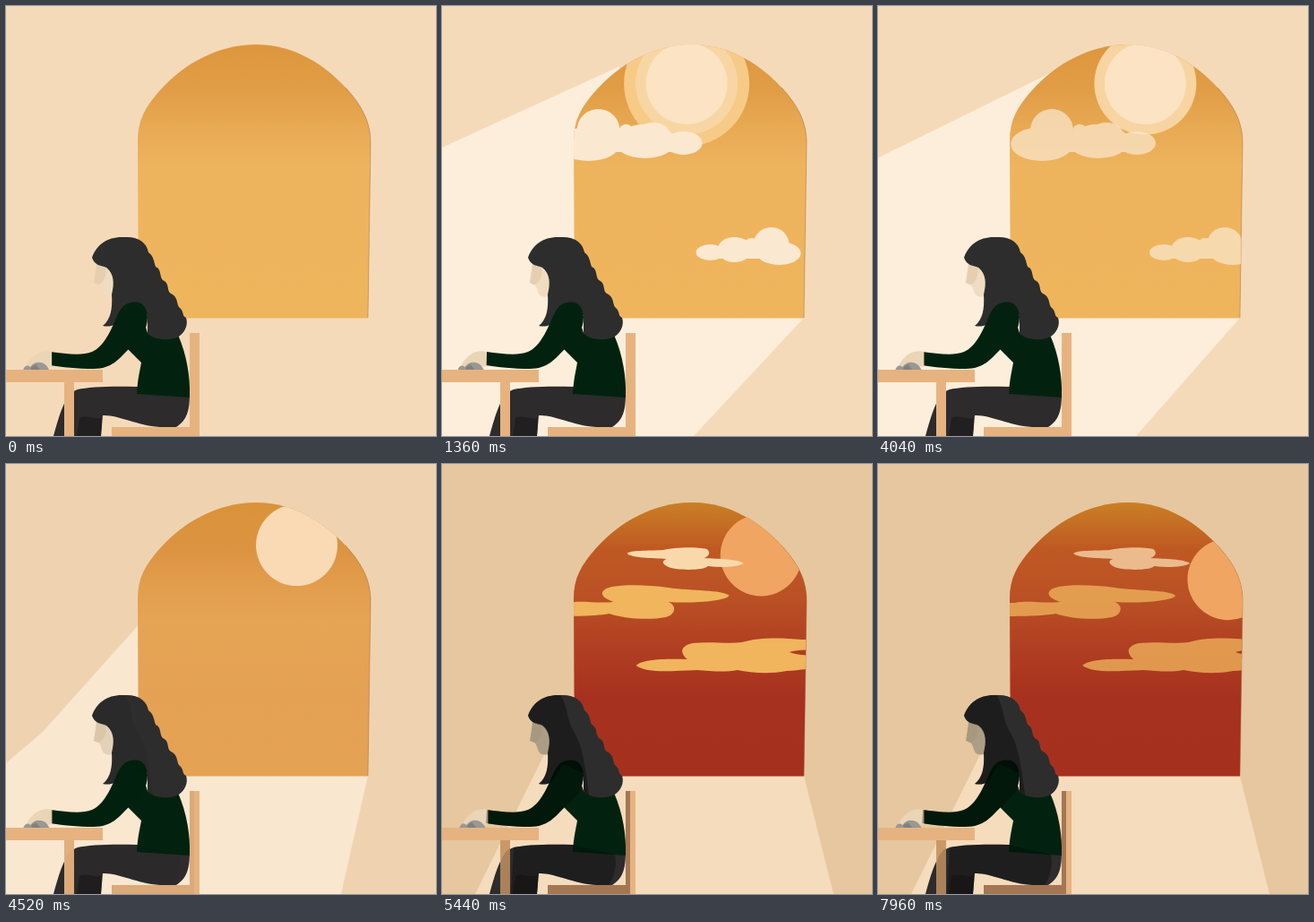
Animation, 480 px wide and 480 px high, one loop 8 s. Source, as an HTML page:

```html
<!DOCTYPE html>
<html lang="en">
<head>
<meta charset="utf-8">
<title>Window light</title>
<style>
html, body { margin: 0; width: 100%; height: 100%; overflow: hidden; background: #f5daba; }
svg { display: block; width: 100vw; height: 100vh; }
</style>
</head>
<body>
<svg viewBox="0 0 480 480">
  <defs>
    <linearGradient id="day" gradientUnits="userSpaceOnUse" x1="0" y1="42" x2="0" y2="348">
      <stop offset="0" stop-color="#dd963d"/>
      <stop offset=".17" stop-color="#e19d46"/>
      <stop offset=".3" stop-color="#e8a953"/>
      <stop offset=".44" stop-color="#eeb35d"/>
      <stop offset="1" stop-color="#efb55d"/>
    </linearGradient>
    <linearGradient id="dusk" gradientUnits="userSpaceOnUse" x1="0" y1="42" x2="0" y2="348">
      <stop offset="0" stop-color="#ca8025"/>
      <stop offset=".17" stop-color="#bf5923"/>
      <stop offset=".36" stop-color="#ba5025"/>
      <stop offset=".54" stop-color="#b03e22"/>
      <stop offset=".71" stop-color="#a7311f"/>
      <stop offset="1" stop-color="#a6301e"/>
    </linearGradient>
    <path id="arch" d="M148 348.5L147 150C147 128 155 113 172 94C198 65 236 43 279 43C322 43 356 66 379 91C398 112 407 130 407 153L404 348.5Z"/>
    <clipPath id="pane"><use href="#arch"/></clipPath>
    <path id="hairShape" d="M96 281C101 266 114 257 132 258C148 257 157 264 159 275C165 279 165 286 167 291C174 294 171 302 175 306C183 309 179 318 184 321C193 325 190 334 194 337C199 341 196 346 201 348C204 356 199 366 191 370C181 374 164 373 158 365V345L135 335C130 342 127 349 122 355C118 358 112 358 108 357C117 350 119 338 118 322C121 310 121 299 112 292C106 289 100 291 96 281Z"/>
    <clipPath id="hairClip"><use href="#hairShape"/></clipPath>
    <path id="torso" d="M150 340L158 365C172 372 184 372 192 367C202 390 206 415 205 437L146 433C147 415 150 405 151 398C145 392 140 387 136 383Z"/>
    <path id="arm" d="M124 346C129 336 133 331 143 330.5C153 330 157 337 158 347C158 362 150 373 137 383C126 394 118 405 98 405C80 405 62 403 49 401L50 386C66 388 84 391 96 386C110 380 118 360 124 346Z"/>
    <path id="face" d="M101 288C100 296 99 303 98 309L103 311C106 313 106 317 108 321C110 325 115 325 118 324C121 310 121 298 112 291Z"/>
  </defs>

  <rect id="wall" width="480" height="480"/>
  <polygon id="beam"/>

  <use href="#arch" fill="url(#day)"/>
  <use id="duskSky" href="#arch" fill="url(#dusk)"/>
  <path d="M379 91C398 112 407 130 407 153L404 348" fill="none" stroke="#8f5a30" stroke-width=".6" opacity=".7"/>
  <g clip-path="url(#pane)">
    <g id="sun">
      <circle id="halo" r="70" fill="#f7ca88"/>
      <circle id="ring" r="57" fill="#f8d6a3"/>
      <circle id="disc" r="45.5"/>
    </g>
    <g id="dayClouds" fill="#fbe8d0">
      <ellipse cx="183" cy="154" rx="35" ry="19"/>
      <circle cx="194" cy="139" r="24"/>
      <circle cx="225" cy="140" r="8"/>
      <ellipse cx="246" cy="151" rx="34" ry="19"/>
      <ellipse cx="255" cy="142" rx="18" ry="12"/>
      <ellipse cx="289" cy="153" rx="21" ry="13"/>
      <rect x="200" y="142" width="80" height="21"/>
      <ellipse cx="319" cy="275" rx="16" ry="9"/>
      <ellipse cx="346" cy="272" rx="19" ry="14"/>
      <circle cx="365" cy="267" r="8"/>
      <circle cx="387" cy="267" r="20"/>
      <ellipse cx="396" cy="276" rx="24" ry="13"/>
      <rect x="325" y="268" width="50" height="14"/>
    </g>
    <g id="duskClouds" fill="#f0b55d">
      <path id="wisp" d="M212 100C215 96 235 97 252 96C262 93 290 92 301 95C306 99 303 103 298 105C315 106 335 106 342 111C335 115 318 116 302 114C298 119 268 119 258 115C250 111 251 108 256 106C240 105 218 105 212 100Z"/>
      <path d="M100 155H147C160 152 178 156 197 154C185 150 181 145 187 140C195 134 230 134 258 138C285 142 318 140 326 147C322 153 285 156 258 154C268 158 266 168 255 171C235 175 205 172 192 167C175 170 160 170 100 170Z"/>
      <path d="M222 225C228 218 255 217 279 218C270 210 272 203 285 200C305 198 325 201 340 199C360 193 385 194 407 196H440V208C420 207 402 207 393 210C402 214 420 214 440 215V226C420 228 405 230 390 231C370 235 350 233 335 230C320 233 305 231 290 230C260 231 235 234 222 225Z"/>
    </g>
  </g>

  <path d="M146 425C120 424 92 425 80 428C67 433 62 448 53 480H106L108 457C125 456 145 468 172 470H190C203 462 205 450 205 432Z" fill="#2d2b2c"/>
  <path d="M82 460C90 456 98 462 107 460L106 480H79Z" fill="#221f21"/>
  <use href="#face" fill="#efdcc1"/>
  <path d="M101 288C100 296 99 303 98 309L103 311C109 309 113 301 111 291Z" fill="#e5cfb0"/>
  <use href="#torso" fill="#02220f"/>
  <use href="#hairShape" fill="#2d2d2d"/>
  <use href="#arm" fill="#02220f"/>

  <g id="hand">
    <path d="M50 386C42 384 30 386 22 401L27 404C36 400 46 404 50 402Z" fill="#ead5b6"/>
    <path d="M18 406C20 400 24 401 26 403C31 395 43 396 47 406Z" fill="#999895"/>
    <path d="M27 403L32 400L37 406H27Z" fill="#82817f"/>
  </g>
  <g fill="#e6b380">
    <rect x="205" y="365" width="11" height="115"/>
    <rect x="118" y="470" width="98" height="10"/>
    <rect y="406" width="108" height="14"/>
    <rect x="65" y="420" width="11" height="60"/>
  </g>

  <g id="shade">
    <path d="M205 365H210V470H205Z M118 470H210V480H118Z" fill="#9f704e" opacity=".9"/>
    <path d="M65 420H76V480H65Z" fill="#b78758" opacity=".6"/>
    <path d="M76 429C70 433 67 439 65 446V480H76Z" fill="#6f563c" opacity=".35"/>
    <use href="#face" fill="#7f735f" opacity=".6"/>
    <path clip-path="url(#hairClip)" d="M90 250H125C142 262 137 285 148 300C158 318 160 340 165 375H90Z" opacity=".36"/>
    <use href="#arm" opacity=".3"/>
    <path d="M146 425C120 424 92 425 80 428L77 480H106L108 457C125 456 145 468 172 470H186C194 458 195 445 193 436Z" opacity=".3"/>
  </g>
</svg>
<script>
const LOOP = 8;
const $ = id => document.getElementById(id);
const set = (id, attrs) => {
  for (const k in attrs) $(id).setAttribute(k, attrs[k]);
};
const ramp = (t, a, b) => Math.min(1, Math.max(0, (t - a) / (b - a)));
const smooth = u => u * u * (3 - 2 * u);
const mix = (a, b, u) => a + (b - a) * u;
const blend = (a, b, u) => `rgb(${a.map((v, i) => Math.round(mix(v, b[i], u)))})`;
const shift = (x, y = 0) => `translate(${x.toFixed(2)} ${y.toFixed(2)})`;

const DAY_BEAM = [[197, 68], [-20, 167], [-480, 480], [281, 480], [404, 348]];
const DUSK_BEAM = [[190, 171], [82, 389], [37, 480], [437, 480], [404, 348]];

function draw(t) {
  const appear = smooth(ramp(t, 0, .6));
  const turn = smooth(ramp(t, 3.9, 5));
  const dusk = ramp(t, 4.4, 5.25);
  const late = (turn + dusk) / 2;
  const slow = Math.max(0, 4.07 - t) ** 2;
  const since = t - 4.92;

  set('wall', { fill: blend([245, 218, 186], [230, 199, 159], late) });
  set('beam', {
    points: DAY_BEAM.map((p, i) => p.map((v, j) => mix(v, DUSK_BEAM[i][j], turn))).join(' '),
    fill: blend([252, 238, 219], [245, 220, 189], late),
    opacity: appear
  });
  set('duskSky', { opacity: dusk });

  set('sun', {
    transform: shift(mix(296.6 - 3.2 * slow, 349 + 13.8 * since, turn),
      mix(86.5, 97 + 9.2 * since + .4 * since * since, turn)),
    opacity: appear
  });
  set('halo', { opacity: 1 - ramp(t, 3.5, 4) });
  set('ring', { opacity: 1 - ramp(t, 4.03, 4.5) });
  set('disc', { fill: blend([251, 227, 195], [240, 165, 98], dusk) });

  set('dayClouds', { transform: shift(-2.65 * slow), opacity: appear * (1 - ramp(t, 3.89, 4.4)) });
  set('duskClouds', {
    transform: shift(4.6 * (t - 6.6)),
    opacity: ramp(t, 4.55, 5.4) * (1 - ramp(t, 7.6, 9.2))
  });
  set('wisp', { fill: blend([240, 181, 93], [249, 217, 172], ramp(t, 4.7, 5.4)) });

  set('hand', { transform: shift(1.4 * Math.cos(2 * Math.PI * (Math.min(t, 3.85) - .35) / 3.5)) });
  set('shade', { opacity: dusk });
}

const start = performance.now();
function tick() {
  draw((performance.now() - start) / 1000 % LOOP);
  requestAnimationFrame(tick);
}
tick();
</script>
</body>
</html>
```
